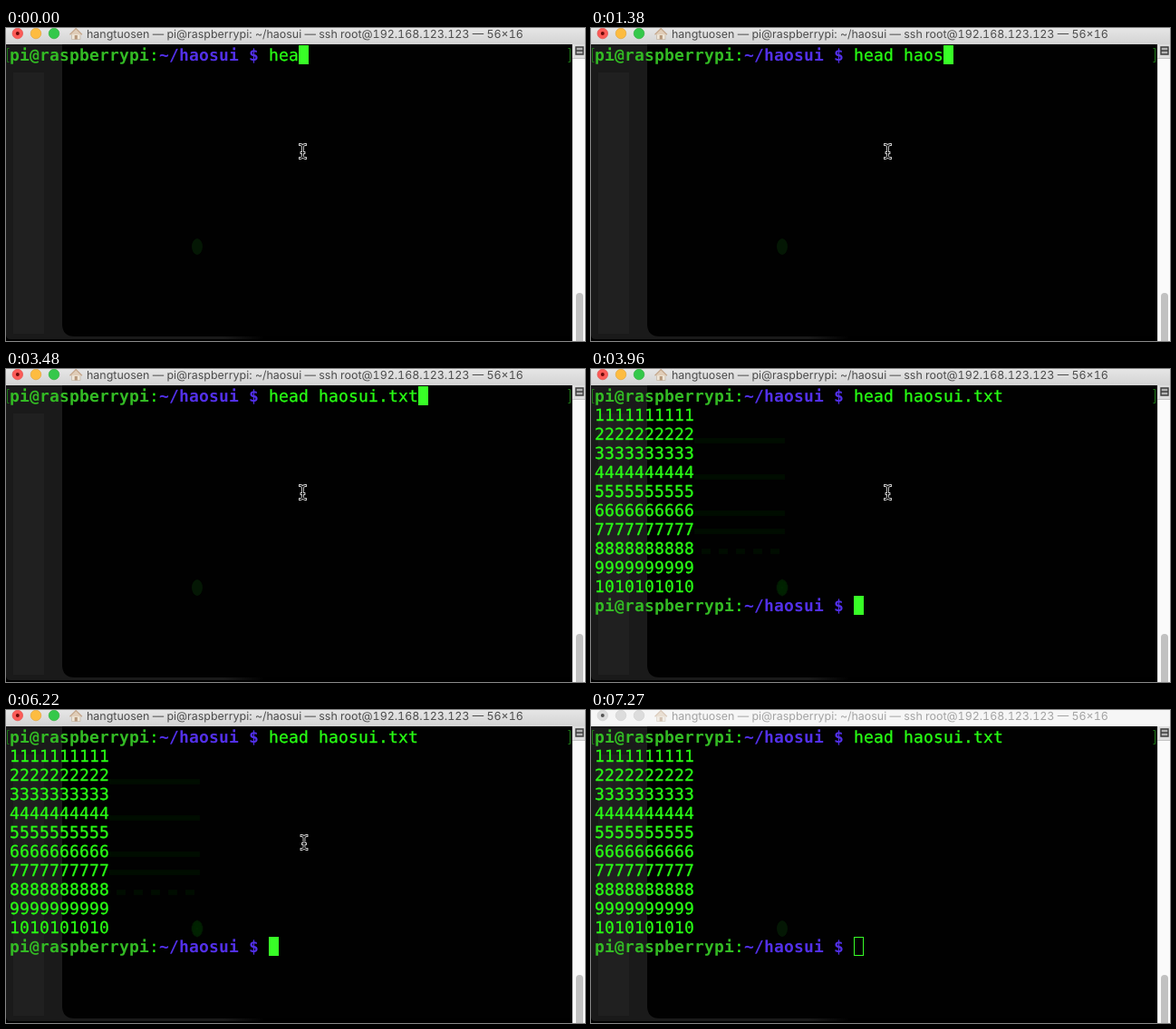
Animation of 639 by 345 pixels, one loop 7.32 s. Source, as an HTML page:

```html
<!DOCTYPE html>
<html lang="en">
<head>
<meta charset="utf-8">
<title>Terminal</title>
<style>
  html, body { margin: 0; width: 100%; height: 100%; overflow: hidden; background: #000; }
  svg { display: block; width: 639px; height: 345px; }
  .term text {
    font: 18px "DejaVu Sans Mono", monospace;
    letter-spacing: .163px;
    white-space: pre;
    text-rendering: geometricPrecision;
    fill: #28fe14;
    stroke: #28fe14;
    stroke-width: .3px;
  }
  .term .host { font-weight: bold; fill: #33bb24; stroke: none; }
  .term .path { font-weight: bold; fill: #5230e8; stroke: none; }
  .term .colon { stroke: none; }
  .title {
    font: 12.45px Inter, sans-serif;
    font-variant-numeric: tabular-nums;
    text-rendering: geometricPrecision;
    fill: #4c4c4c;
  }
  .bar { fill: url(#active); }
  .idle .bar { fill: #f6f6f6; }
  .idle .light { fill: #dcdcdc; stroke: #cfcfcf; }
  .idle .title { fill: #a3a3a3; }
  .idle .house { opacity: .55; }
  .idle .dot { fill: #555; }
  .caret { fill: #38fe27; }
  .idle .caret { fill: none; stroke: #38fe27; }
</style>
</head>
<body>
<svg id="stage" viewBox="0 0 639 345">
  <defs>
    <linearGradient id="active" x2="0" y2="1">
      <stop stop-color="#e6e6e6"/><stop offset="1" stop-color="#d3d3d3"/>
    </linearGradient>
    <linearGradient id="edge">
      <stop offset=".8" stop-color="#1a1a1a"/><stop offset="1" stop-color="#000"/>
    </linearGradient>
    <filter id="soft" x="-20%" y="-20%" width="140%" height="140%"><feGaussianBlur stdDeviation="1"/></filter>
    <path id="beamShape" d="M-3 -7.5Q-.5 -7.5 0 -5.5Q.5 -7.5 3 -7.5M0 -5.5V5.5M-3 7.5Q-.5 7.5 0 5.5Q.5 7.5 3 7.5M-1.5 1.5H1.5"/>
  </defs>

  <!-- translucent window body -->
  <rect width="639" height="345"/>
  <path d="M0 18H90V343H5Q0 343 0 338Z" fill="#1a1a1a"/>
  <rect x="60" y="339" width="225" height="4" fill="url(#edge)"/>
  <rect x="8" y="49" width="34" height="288" fill="#202020"/>
  <path d="M62 18H625V340H76Q62 340 62 326Z" fill="#010101"/>
  <ellipse cx="211" cy="241" rx="6" ry="9" fill="#041704"/>
  <g id="glow" filter="url(#soft)" stroke="#020e02" stroke-width="5">
    <path d="M114 79H214M114 119H214M114 159H214M114 179H214"/>
    <path d="M122 201H216" stroke-dasharray="10 9"/>
    <ellipse cx="211" cy="241" rx="3" ry="6" fill="#042c04" stroke="#042004"/>
  </g>

  <!-- title bar -->
  <rect class="bar" width="639" height="18"/>
  <g stroke-width=".6">
    <circle class="light" cx="12.8" cy="6" r="5.8" fill="#fc5b57" stroke="#df4744"/>
    <circle class="light" cx="33" cy="6" r="5.8" fill="#fdbc40" stroke="#de9f34"/>
    <circle class="light" cx="53" cy="6" r="5.8" fill="#34c84a" stroke="#27aa35"/>
  </g>
  <circle class="dot" cx="12.8" cy="6" r="2" fill="#6b0a08"/>
  <g class="house">
    <path d="M72.5 6H82V12.5H72.5Z" fill="#efe6d8" stroke="#c2b5a4" stroke-width=".7"/>
    <path d="M70.5 7.2L77.2 .6L83.9 7.2" fill="#e0cdb8" stroke="#c4a78c" stroke-width="1.2"/>
    <path d="M75.7 8H78.8V12.5H75.7Z" fill="#b5977a"/>
  </g>
  <text class="title" x="89" y="10.7">hangtuosen — pi@raspberrypi: ~/haosui — ssh root@192.168.123.123 — 56×16</text>

  <!-- scroll bar -->
  <rect x="625" y="18" width="14" height="327" fill="#fafafa"/>
  <path d="M625.5 18V345" stroke="#e2e2e2"/>
  <rect x="625" y="18" width="14" height="15" fill="#dedede"/>
  <path d="M625 33.5H639" stroke="#c4c4c4"/>
  <path d="M629 21H637V29H629ZM629 25H637" fill="#b4b4b4" stroke="#3c3c3c" stroke-width="1.4"/>
  <rect x="629" y="292" width="8" height="70" rx="4" fill="#c1c1c1"/>

  <!-- terminal text -->
  <path d="M3.5 22.5H1.5V37.5H3.5M620.5 22.5H622.5V37.5H620.5" fill="none" stroke="#1c7a16"/>
  <g class="term" id="term"></g>
  <rect id="caret" class="caret"/>

  <g id="beam" fill="none" stroke-linecap="square">
    <use href="#beamShape" stroke="#dcdcdc" stroke-width="2.8"/>
    <use href="#beamShape" stroke="#000" stroke-width="1.1"/>
  </g>
</svg>
<script>
  const LOOP = 7320, RUN = 3960, IDLE = 7270;
  const CELL = 11, ROW = 21, LEFT = 4, TOP = 19, PROMPT = 26, LAST_ROW = 11;
  const COMMAND = "head haosui.txt";
  const PROMPT_HTML = '<tspan class="host">pi@raspberrypi</tspan><tspan class="colon">:</tspan><tspan class="path">~/haosui $</tspan> ';
  const keys = [240, 840, 1020, 1140, 1260, 1380, 1680, 1800, 2520, 2820, 3180, 3480];
  const blinks = [4730, 5210, 5750, 6220, 6760, IDLE];
  // pointer stops: time, x, y
  const moves = [[0, 327.5, 136], [6220, 329, 146], [6280, 335, 196], [6340, 345, 276]];
  const BEAM_END = 6400;

  const el = id => document.getElementById(id);
  const passed = (times, t) => times.filter(k => k <= t).length;
  const show = (node, on) => node.setAttribute("visibility", on ? "visible" : "hidden");
  const setAttrs = (node, attrs) => {
    for (const name in attrs) node.setAttribute(name, attrs[name]);
  };

  function addRow(row, html) {
    const line = document.createElementNS("http://www.w3.org/2000/svg", "text");
    setAttrs(line, { x: LEFT, y: TOP + row * ROW + 17 });
    line.innerHTML = html;
    el("term").append(line);
    return line;
  }

  addRow(0, PROMPT_HTML + '<tspan id="typed"></tspan>');
  const output = [];
  for (let n = 1; n <= 10; n++) {
    output.push(addRow(n, n < 10 ? String(n).repeat(10) : "10".repeat(5)));
  }
  output.push(addRow(LAST_ROW, PROMPT_HTML));

  const stage = el("stage"), typed = el("typed");
  const caret = el("caret"), beam = el("beam"), glow = el("glow");

  function render(t) {
    const done = t >= RUN, idle = t >= IDLE;
    const count = 3 + passed(keys, t);
    typed.textContent = COMMAND.slice(0, count);
    output.forEach(line => show(line, done));
    show(glow, done && !idle);
    stage.classList.toggle("idle", idle);

    const inset = idle ? 0.5 : 0;
    setAttrs(caret, {
      x: LEFT + (PROMPT + (done ? 0 : count)) * CELL + inset,
      y: TOP + (done ? LAST_ROW * ROW : 0) + inset,
      width: CELL - 2 * inset,
      height: ROW - 2 * inset
    });
    show(caret, passed(blinks, t) % 2 === 0);

    const [, x, y] = moves.filter(m => m[0] <= t).pop();
    beam.setAttribute("transform", `translate(${x} ${y})`);
    show(beam, t < BEAM_END);
  }

  function tick() {
    render(performance.now() % LOOP);
    requestAnimationFrame(tick);
  }
  tick();
</script>
</body>
</html>
```
